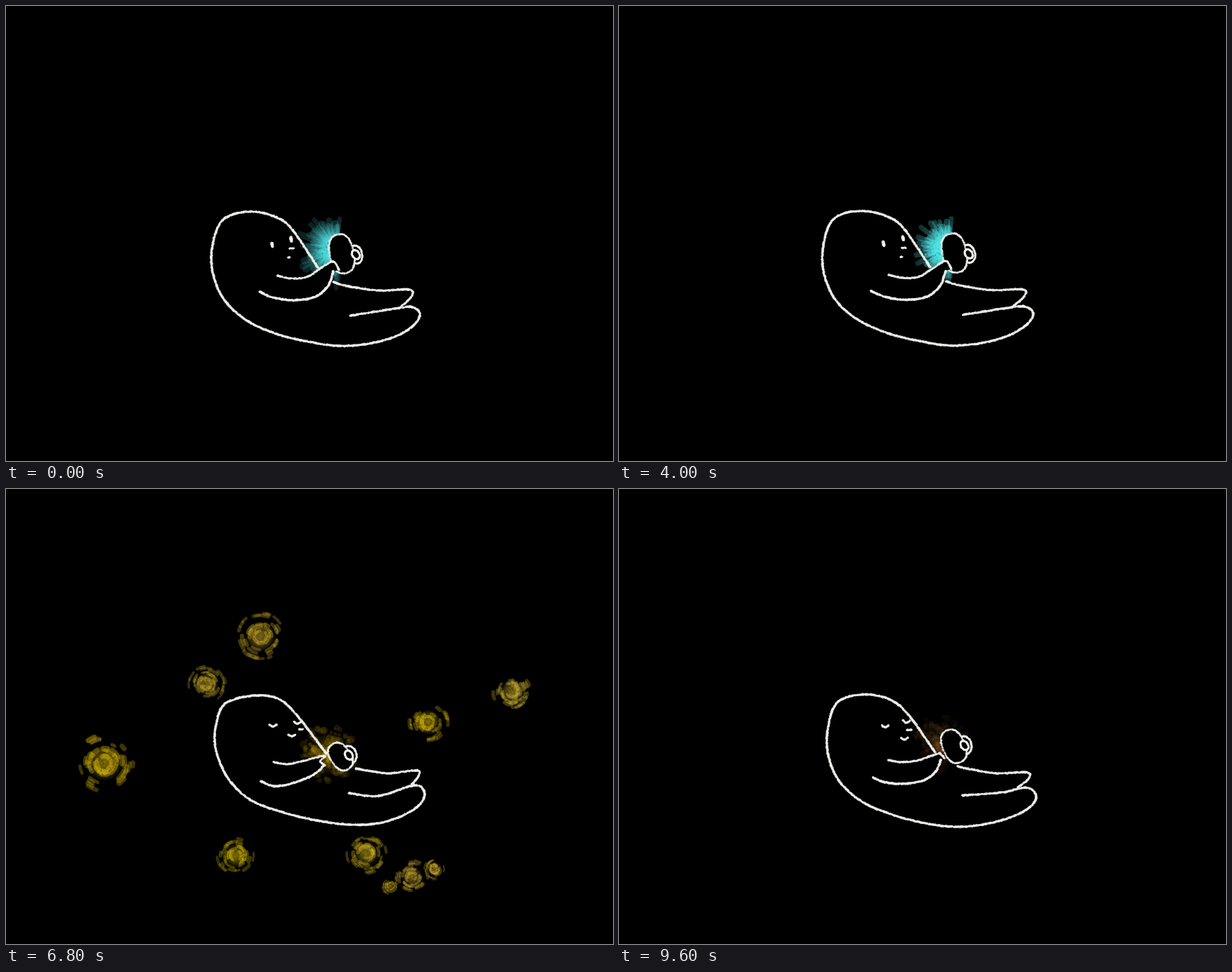
Recreate the animation shown at these times as an HTML page with a canvas. Size 864 px wide and 648 px high, loop 9.8 s.

```html
<!DOCTYPE html>
<html lang="en">
<head>
<meta charset="utf-8">
<title>Warm mug</title>
<style>
html, body { margin: 0; width: 100%; height: 100%; overflow: hidden; background: #000; }
canvas { display: block; width: 864px; height: 648px; }
</style>
</head>
<body>
<canvas id="stage" width="864" height="648"></canvas>
<script>
const ctx = document.getElementById('stage').getContext('2d');
const STEP = 200, STEPS = 49, TAU = Math.PI * 2;

// Two key poses; everything between is blended and set swaying.
const awake = {
  body: '490 441 560 430 579 429 589 438 582 453 556 470 515 481 472 484 430 478 385 467 343 448 311 419 295 383 293 348 303 312 322 297 353 293 385 301 408 319 444 373',
  leg: '466 393 486 399 530 405 574 404 577 414 560 430',
  armTop: '386 384 405 388 428 386 450 372 466 364 474 376',
  armLow: '361 407 380 415 410 419 440 414 458 399 466 378',
  face: '379 340 406 332 407 345 403 358',
  cups: '478 353 498 354'
};
const asleep = {
  body: '488 433 530 437 582 422 596 434 588 450 565 465 530 476 488 478 442 472 396 461 350 444 319 416 302 383 297 350 306 313 324 300 357 294 388 299 413 321 456 377',
  leg: '498 398 520 402 545 405 586 401 585 412 577 421',
  armTop: '381 389 400 392 420 388 453 380 447 388 454 393',
  armLow: '363 416 380 423 400 421 425 413 442 404 452 394',
  face: '380 337 415 333 420 342 407 351',
  cups: '476 381 488 379'
};

// x, y, radius; the last two groups take turns
const orbs = {
  both: [[286, 278, 28], [513, 519, 30]],
  even: [[362, 210, 36], [721, 289, 30], [601, 332, 30], [140, 390, 43],
         [327, 522, 28], [578, 552, 25], [610, 541, 17], [547, 565, 13]],
  odd: [[184, 332, 31], [544, 274, 23], [713, 423, 26], [298, 460, 25], [328, 517, 25]]
};

const clamp = v => Math.max(0, Math.min(1, v));
const lerp = (a, b, t) => a + (b - a) * t;

function random(seed) {
  let s = seed * 2654435761 >>> 0;
  return () => {
    s = s + 0x6D2B79F5 | 0;
    let t = Math.imul(s ^ s >>> 15, 1 | s);
    t = t + Math.imul(t ^ t >>> 7, 61 | t) ^ t;
    return ((t ^ t >>> 14) >>> 0) / 4294967296;
  };
}

function toPoints(text) {
  const n = text.split(' ').map(Number);
  return n.filter((_, i) => i % 2 === 0).map((x, i) => [x, n[i * 2 + 1]]);
}
for (const pose of [awake, asleep]) {
  for (const key in pose) pose[key] = toPoints(pose[key]);
}

// The back sways more than the feet, and each point boils a little.
function makePose(rest, phase, turn) {
  const pose = {};
  for (const key in awake) {
    pose[key] = awake[key].map(([x, y], i) => {
      const [u, v] = asleep[key][i];
      const px = lerp(x, u, rest), py = lerp(y, v, rest);
      const sway = 4 * clamp((500 - px) / 200) * Math.sin(turn);
      const boil = 0.7 * (Math.sin(i * 1.3 + phase * 2) - Math.sin(i * 1.3));
      return [px + sway + boil, py + boil - Math.abs(Math.sin(turn))];
    });
  }
  return pose;
}

// Catmull-Rom samples, about one per pixel
function curve(points) {
  const n = points.length, out = [];
  const at = i => points[Math.max(0, Math.min(n - 1, i))];
  for (let i = 0; i < n - 1; i++) {
    const [a, b, c, d] = [at(i - 1), at(i), at(i + 1), at(i + 2)];
    const count = Math.ceil(Math.hypot(c[0] - b[0], c[1] - b[1])) + 1;
    for (let k = 0; k < count; k++) {
      const t = k / count;
      out.push([0, 1].map(q => b[q] + t / 2 * (c[q] - a[q] +
        t * (2 * a[q] - 5 * b[q] + 4 * c[q] - d[q] + t * (3 * (b[q] - c[q]) + d[q] - a[q])))));
    }
  }
  return [...out, at(n - 1)];
}

// Tilted closed shape; a power below 1 squares its corners
function ring([x, y], w, h, tilt, power) {
  const bend = v => Math.sign(v) * Math.abs(v) ** power;
  const cos = Math.cos(tilt), sin = Math.sin(tilt);
  return Array.from({ length: 130 }, (_, i) => {
    const a = i / 130 * TAU, u = w * bend(Math.cos(a)), v = h * bend(Math.sin(a));
    return [x + u * cos - v * sin, y + u * sin + v * cos];
  });
}

function dot(x, y, r) {
  ctx.beginPath();
  ctx.arc(x, y, r, 0, TAU);
  ctx.fill();
}

function chalk(points, size, rnd) {
  ctx.fillStyle = 'rgba(240,240,238,.75)';
  for (const [x, y] of points) {
    dot(x + rnd() - 0.5, y + rnd() - 0.5, size * (0.7 + rnd() * 0.4));
  }
}

function fillBlack(points) {
  ctx.fillStyle = '#000';
  ctx.beginPath();
  points.forEach(([x, y]) => ctx.lineTo(x, y));
  ctx.fill();
}

function grain(x, y, r, count, rnd) {
  ctx.fillStyle = 'rgba(0,0,0,.22)';
  for (let i = 0; i < count; i++) {
    ctx.fillRect(x + (rnd() * 2 - 1) * r, y + (rnd() * 2 - 1) * r, 1.5, 1.5);
  }
}

function fade(x, y, r, rgb, ...alphas) {
  const g = ctx.createRadialGradient(x, y, 0, x, y, r);
  alphas.forEach((a, i) => g.addColorStop(i / (alphas.length - 1), `rgba(${rgb},${a})`));
  return g;
}

// Broad brush strokes fanning out behind the mug
function rays([x, y], r, rgb, alpha, rnd) {
  const count = 34;
  ctx.globalAlpha = alpha;
  ctx.lineCap = 'round';
  ctx.strokeStyle = fade(x, y, r, rgb, 0.8, 0.65, 0.3, 0.2);
  for (let i = 0; i < count; i++) {
    const a = lerp(1.4, 4.9, (i + rnd()) / count), len = r * lerp(0.55, 0.95, rnd());
    ctx.lineWidth = r * lerp(0.11, 0.18, rnd());
    ctx.beginPath();
    ctx.moveTo(x, y);
    ctx.lineTo(x + Math.cos(a) * len, y + Math.sin(a) * len);
    ctx.stroke();
  }
  ctx.globalAlpha = 1;
  grain(x, y, r, 400, rnd);
}

// Soft mottled dabs
function cloud(x, y, r, rgb, alpha, rnd) {
  ctx.globalAlpha = alpha;
  ctx.fillStyle = fade(x, y, r * 0.75, rgb, 0.6, 0.25, 0);
  dot(x, y, r);
  for (let i = 0; i < 140; i++) {
    const a = rnd() * TAU, d = r * rnd() ** 0.7;
    ctx.fillStyle = `rgba(${rgb},${0.26 - 0.14 * d / r})`;
    dot(x + Math.cos(a) * d, y + Math.sin(a) * d, 2 + rnd() * 3.5);
  }
  ctx.globalAlpha = 1;
  grain(x, y, r, 500, rnd);
}

// Broken rings of thick dabs around a bright core
function orb([x, y, r], alpha, rnd) {
  const rgb = `200,${165 + rnd() * 10},${rnd() * 50}`;
  ctx.globalAlpha = alpha;
  ctx.lineCap = 'round';
  ctx.fillStyle = fade(x, y, r * 0.6, rgb, 0.65, 0.4, 0);
  dot(x, y, r);
  for (let i = 0; i < 16 + r * 0.7; i++) {
    const d = r * lerp(0.2, 0.95, rnd()), a = rnd() * TAU;
    const half = Math.min(0.8, lerp(2, 7, rnd()) / d);
    ctx.strokeStyle = `rgba(${rgb},${0.48 - 0.2 * d / r})`;
    ctx.lineWidth = r * lerp(0.1, 0.19, rnd());
    ctx.beginPath();
    ctx.arc(x, y, d, a - half, a + half);
    ctx.stroke();
  }
  ctx.globalAlpha = 1;
  grain(x, y, r, r * 10, rnd);
}

function drawOrbs(step, phase) {
  const alpha = clamp((step - 30) / 3) * clamp((48 - step) / 2);
  if (!alpha) return;
  const group = [...orbs.both, ...(phase % 2 ? orbs.odd : orbs.even)];
  for (const o of group) orb(o, alpha, random(o[0]));
}

// Short vertical dashes when awake, little smiles when asleep
function drawFace(points, sleepy, rnd) {
  points.forEach(([x, y], i) => {
    const nose = i === 2, eye = i < 2;
    const w = nose ? 3 : sleepy ? 5 : 1;
    const h = sleepy ? (nose ? 0 : 3) : eye ? 2.5 : 0;
    const line = sleepy || !eye
      ? [[x - w, y - h / 2], [x, y + h / 2], [x + w, y - h / 2]]
      : [[x - 0.5, y - h], [x, y], [x + 0.5, y + h]];
    chalk(curve(line), !sleepy && eye ? 2.4 : 1.7, rnd);
  });
}

function draw(step) {
  const rest = Math.min(clamp((step - 22) / 5), clamp((STEPS + 1 - step) / 4));
  const sleepy = rest >= 0.5;
  const period = sleepy ? 4 : 7;
  const phase = (step + (sleepy ? 2 : 0)) % period;
  const turn = TAU * phase / period;
  const pose = makePose(rest, phase, turn);
  const rnd = random(phase + period * 10);
  const [cup, grip] = pose.cups;

  ctx.fillStyle = '#000';
  ctx.fillRect(0, 0, 864, 648);
  drawOrbs(step, phase);
  if (sleepy) {
    const rgb = [lerp(110, 200, rest), lerp(40, 160, rest), lerp(80, 8, rest)];
    cloud(cup[0] - 18, cup[1] - 4, 41 + 4 * Math.sin(turn), rgb, rest, rnd);
  } else {
    const bright = clamp(0.6 + step * 0.1) * (1 - rest);
    rays([cup[0] - 9, cup[1] - 6], 58 + 8 * Math.sin(turn), '80,228,230', bright, rnd);
  }

  const top = curve(pose.armTop), low = curve(pose.armLow);
  const mug = ring(cup, lerp(17, 14, rest), lerp(28, 21, rest), lerp(-0.2, -0.6, rest), 0.8);
  const handle = ring(grip, lerp(9, 11, rest), 13, -0.2, 1);
  const hole = ring(grip, 5, 7, -0.6, 1);
  chalk(curve(pose.body), 1.85, rnd);
  chalk(curve(pose.leg), 1.8, rnd);
  fillBlack(handle);
  chalk(handle, 1.5, rnd);
  fillBlack(mug);
  chalk(mug, 1.5, rnd);
  fillBlack(hole);
  chalk(hole, 1.3, rnd);
  fillBlack([...top, ...low.slice().reverse()]);
  chalk(top, 1.7, rnd);
  chalk(low, 1.9, rnd);
  drawFace(pose.face, sleepy, rnd);
}

let shown = -1;
function tick() {
  const step = Math.floor(performance.now() / STEP) % STEPS;
  if (step !== shown) draw(shown = step);
  requestAnimationFrame(tick);
}
tick();
</script>
</body>
</html>
```
